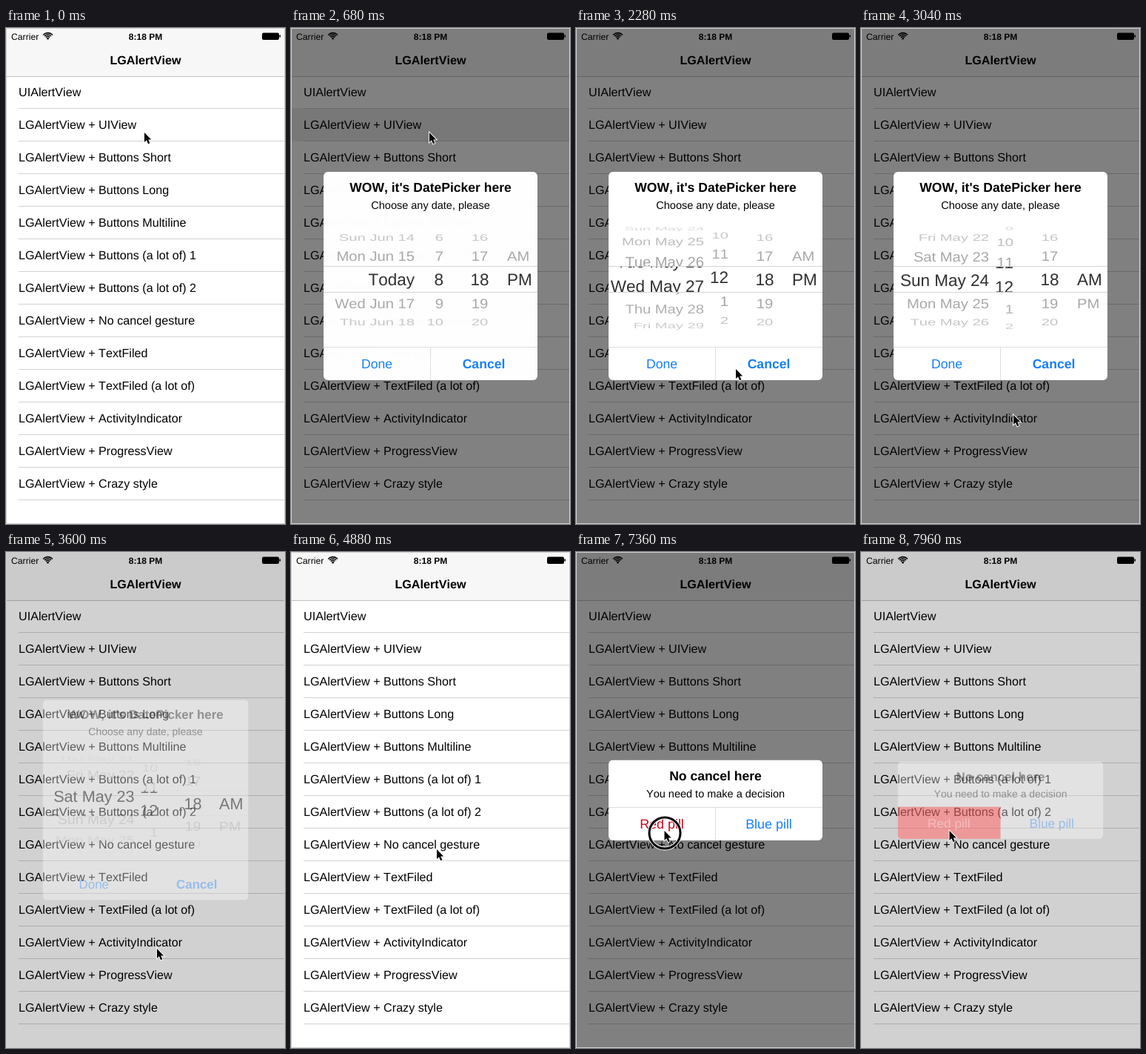
These frames come from a looping animation (377x669 px, 8 s). An HTML page with a canvas:

```html
<!DOCTYPE html>
<html lang="en">
<head>
<meta charset="utf-8">
<title>Alert view demo</title>
<style>
html, body { margin: 0; width: 100%; height: 100%; overflow: hidden; background: #fff; }
canvas { display: block; }
</style>
</head>
<body>
<canvas width="377" height="669"></canvas>
<script>
const W = 377, H = 669, LOOP = 8000, MID = 188.5;
const FONT = '"Liberation Sans", Arial, sans-serif';
const BLUE = '#147efb', RED = '#d0021b';
const g = document.querySelector('canvas').getContext('2d');
// Unhinted, fractional letter advances
g.textRendering = 'geometricPrecision';
g.fontKerning = 'none';

const ROWS = ['UIAlertView', ...['UIView', 'Buttons Short', 'Buttons Long', 'Buttons Multiline',
  'Buttons (a lot of) 1', 'Buttons (a lot of) 2', 'No cancel gesture', 'TextFiled',
  'TextFiled (a lot of)', 'ActivityIndicator', 'ProgressView', 'Crazy style'].map(s => 'LGAlertView + ' + s)];

// Pointer stops: time, x, y
const PATH = [[0, 187, 141], [860, 187, 141], [1050, 130, 320], [1250, 136, 400], [1620, 199, 310],
  [1760, 204, 390], [2200, 216, 460], [2600, 216, 460], [3200, 204, 535], [4300, 204, 535],
  [4850, 197, 401], [6060, 197, 401], [6450, 158, 215], [6860, 158, 218], [7090, 119.5, 376], [8000, 119.5, 376]];
const CLICKS = [40, 3320, 4960, 5880, 6520, 7360];

const clamp = v => Math.max(0, Math.min(1, v));
const smooth = v => (v = clamp(v), v * v * (3 - 2 * v));
const spring = ms => { const w = Math.max(0, ms) * .012; return 1 - (1 + w) * Math.exp(-w); };

function rect(x, y, w, h, color) {
  g.fillStyle = color;
  g.fillRect(x, y, w, h);
}

function text(str, x, y, size, color = '#000', align = 'left', weight = '') {
  g.font = `${weight} ${size}px ${FONT}`;
  g.fillStyle = color;
  g.textAlign = align;
  g.fillText(str, x, y);
}

function statusBar() {
  text('Carrier', 7, 15.5, 12.2);
  text('8:18 PM', MID, 15.5, 12, '#000', 'center', 'bold');
  g.strokeStyle = '#000';
  g.lineWidth = 1.6;
  for (const r of [3.6, 6, 8.4]) {
    g.beginPath();
    g.arc(56.5, 15, r, -Math.PI * .77, -Math.PI * .23);
    g.stroke();
  }
  g.fillStyle = '#000';
  g.beginPath();
  g.arc(56.5, 14.2, 1.4, 0, 7);
  g.fill();
  g.beginPath();
  g.roundRect(346, 6.5, 23, 9.5, 2);
  g.fill();
  rect(369.5, 9.5, 1.5, 3, '#000');
}

function list(t) {
  rect(0, 0, W, H, '#fff');
  const highlight = (row, on, off) => {
    if (t < on) return;
    g.globalAlpha = 1 - clamp((t - off) / 300);
    rect(0, 64 + 44 * row, W, 45, '#d9d9d9');
    g.globalAlpha = 1;
  };
  highlight(1, 120, 530);
  highlight(7, 5040, 5500);
  rect(0, 0, W, 65, '#f7f7f7');
  rect(0, 65, W, 1, '#c2c2c4');
  statusBar();
  text('LGAlertView', MID, 49, 16.2, '#000', 'center', 'bold');
  ROWS.forEach((row, i) => {
    text(row, 17, 92 + 44 * i, 16.15);
    rect(17, 108 + 44 * i, W, 1, '#d2d1d5');
  });
}

function dayName(n) {
  return n === 47 ? 'Today' : new Date(2015, 4, n).toDateString().slice(0, 10).replace(' 0', ' ');
}

function wheels(t) {
  const date = t < 1250 ? 47 - 3 * clamp((t - 1050) / 200) ** 2
    : 22.87 + 21.13 * Math.exp((1250 - t) / 607);
  const hour = 11.7 + 8.3 * Math.exp(-Math.max(0, t - 1700) / 191);
  const half = 1 - smooth((t - 2650) / 300);
  return [
    { pos: date, label: dayName, x: n => n < 32 ? 173 : 167, align: 'right' },
    { pos: hour, label: n => (n + 11) % 12 + 1, x: () => 206, align: 'right' },
    { pos: 18, label: n => n, x: () => 255, align: 'center' },
    { pos: half, label: n => ['AM', 'PM'][n] || '', x: () => 292, align: 'left' }
  ];
}

function picker(t) {
  const cy = 339.3;
  const draw = (size, color) => {
    for (const { pos, label, x, align } of wheels(t)) {
      for (let n = Math.round(pos) - 3; n <= Math.round(pos) + 3; n++) {
        const a = (n - pos) * .45;
        if (Math.abs(a) > 1.3) continue;
        g.save();
        g.translate(x(n), cy + 73 * Math.sin(a));
        g.scale(1, Math.cos(a));
        text(label(n), 0, size * .36, size, color(a), align);
        g.restore();
      }
    }
  };
  const clipped = (bands, alpha, ...look) => {
    g.save();
    g.globalAlpha = alpha;
    g.beginPath();
    for (const [y, h] of bands) g.rect(44, y, 289, h);
    g.clip();
    draw(...look);
    g.restore();
  };
  clipped([[265, 56], [357, 56]], g.globalAlpha, 20.2, a => {
    const v = Math.round(164 + 62 * clamp((Math.abs(a) - .4) / .95));
    return `rgb(${v},${v},${v})`;
  });
  // The magnified row fades out more slowly
  clipped([[321, 36]], Math.sqrt(g.globalAlpha), 22.5, () => '#303030');
  rect(44, 321, 289, 1, '#d4d4d4');
  rect(44, 356, 289, 1, '#d4d4d4');
}

function panel(top, bottom, title, message) {
  g.beginPath();
  g.roundRect(44, top, 289, bottom - top, 6);
  g.clip();
  rect(44, top, 289, bottom - top, '#fff');
  text(title, MID, top + 27, 17.55, '#000', 'center', 'bold');
  text(message, MID, top + 50, 14.5, '#000', 'center');
  rect(44, bottom - 45, 289, 1, '#dedee0');
  rect(188, bottom - 45, 1, 45, '#dedee0');
}

function dateAlert(t) {
  panel(194, 475, "WOW, it's DatePicker here", 'Choose any date, please');
  picker(t);
  text('Done', 116, 459, 17.6, BLUE, 'center');
  text('Cancel', 260.5, 459, 17.6, BLUE, 'center', 'bold');
}

function pillAlert(t) {
  panel(280.5, 389, 'No cancel here', 'You need to make a decision');
  const pressed = t >= 7560;
  if (pressed) rect(44, 344, 144.5, 45, '#ff1818');
  text('Red pill', 116, 373, 17.9, pressed ? '#fff' : RED, 'center');
  text('Blue pill', 260.5, 373, 17.9, BLUE, 'center');
}

function present(t, start, end, cy, draw) {
  if (t <= start || t > end + 780) return;
  const shown = spring(t - start), gone = spring(t - end);
  const alpha = shown * (1 - gone);
  const scale = 1.2 - .2 * shown - .06 * gone;
  rect(0, 0, W, H, `rgba(0,0,0,${alpha / 2})`);
  g.save();
  g.globalAlpha = alpha;
  if (Math.abs(scale - 1) > .003) {
    g.translate(MID, cy);
    g.scale(scale, scale);
    g.translate(-MID, -cy);
  }
  draw(t);
  g.restore();
}

function pointer(t) {
  const i = PATH.findIndex(p => p[0] > t);
  const [t0, x0, y0] = PATH[i - 1], [t1, x1, y1] = PATH[i];
  const k = smooth((t - t0) / (t1 - t0));
  g.save();
  g.translate(x0 + (x1 - x0) * k, y0 + (y1 - y0) * k);
  if (CLICKS.some(c => t >= c && t < c + 40)) {
    g.beginPath();
    g.arc(.5, 3, 21, 0, 7);
    for (const [width, color] of [[5, '#fff'], [3, '#000']]) {
      g.lineWidth = width;
      g.strokeStyle = color;
      g.stroke();
    }
  }
  g.scale(.92, .92);
  g.beginPath();
  for (const p of [[0, 0], [0, 14], [3.2, 11.2], [5.5, 16.6], [8, 15.5], [5.7, 10.2], [10, 10.2]]) g.lineTo(...p);
  g.closePath();
  g.lineWidth = 2;
  g.strokeStyle = '#fff';
  g.stroke();
  g.fillStyle = '#000';
  g.fill();
  g.restore();
}

function render(t) {
  list(t);
  present(t, 140, 3420, 334.5, dateAlert);
  present(t, 5057, 7780, 335, pillAlert);
  pointer(t);
  g.lineWidth = 1;
  g.strokeStyle = '#d0d0d0';
  g.strokeRect(.5, .5, W - 1, H - 1);
}

const began = performance.now();
function tick() {
  render((performance.now() - began) % LOOP);
  requestAnimationFrame(tick);
}
tick();
</script>
</body>
</html>
```
